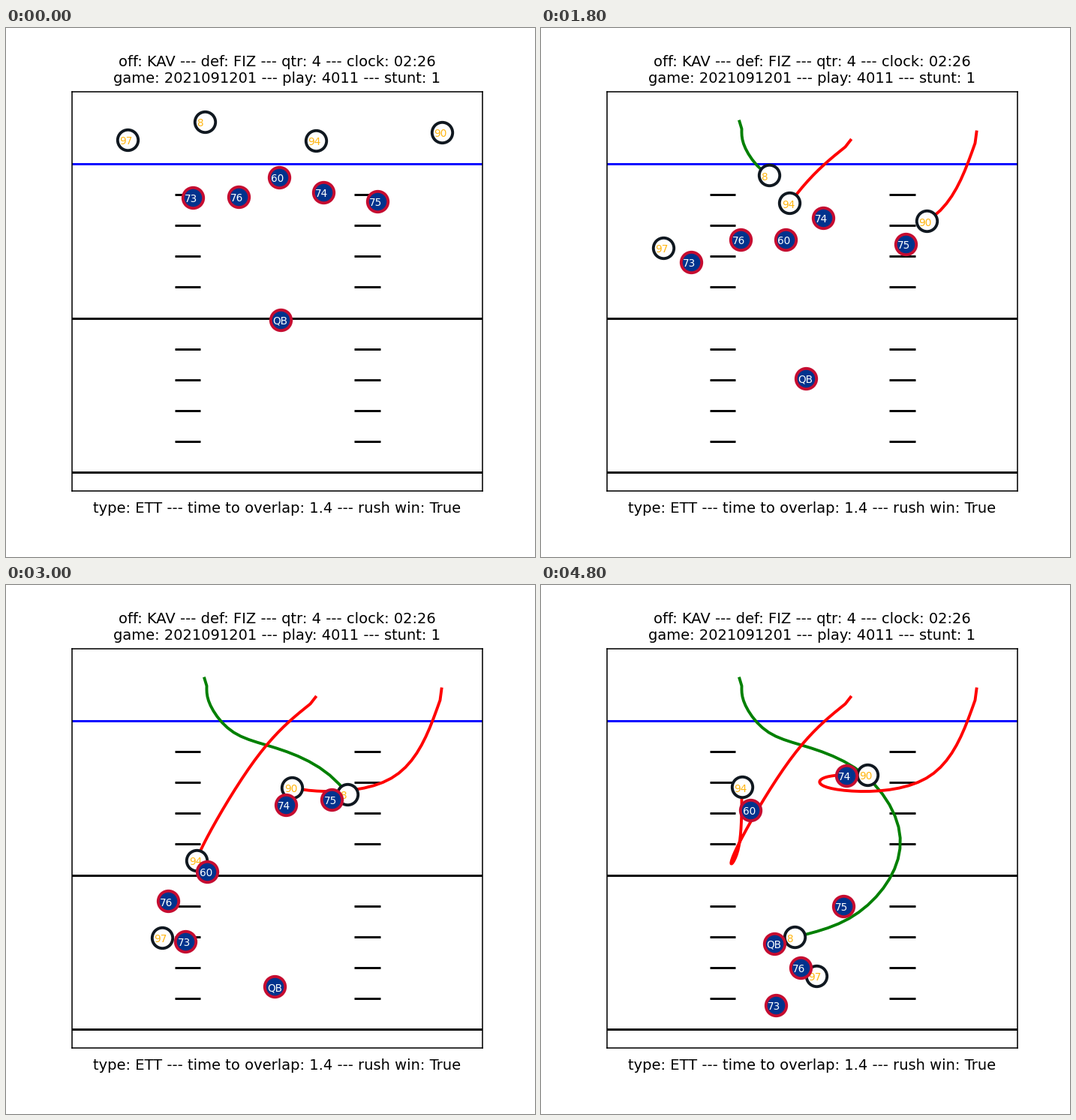
Write a matplotlib script that moves like this. It is 705 px wide and 705 px high and loops after 4.9 s.

```python
import numpy as np
import matplotlib.pyplot as plt
from matplotlib.animation import FuncAnimation

SIZE, DPI, FRAMES, INTERVAL = 705, 140, 49, 100
SNAP = 8                              # frame on which the play starts
SCRIMMAGE, YARD = 180.63, 41.08       # pixels

OFFENSE = dict(fill="#00338D", edge="#C60C30", ink="white", z=6)
DEFENSE = dict(fill="white", edge="#101820", ink="#FFB612", z=4)

plt.rcParams["font.family"] = "DejaVu Sans"
fig = plt.figure(figsize=(SIZE / DPI, SIZE / DPI), dpi=DPI, facecolor="white")
ax = fig.add_axes([0.125, 0.125, 0.775, 0.755])

# Data units are pixels of the whole stage, whole numbers at pixel centres.
ax.set_xlim(0.125 * SIZE - 0.5, 0.9 * SIZE - 0.5)
ax.set_ylim(0.875 * SIZE - 0.5, 0.12 * SIZE - 0.5)
ax.set(xticks=[], yticks=[])
ax.set_title("off: KAV --- def: FIZ --- qtr: 4 --- clock: 02:26\n"
             "game: 2021091201 --- play: 4011 --- stunt: 1", fontsize=10)
ax.set_xlabel("type: ETT --- time to overlap: 1.4 --- rush win: True",
              fontsize=10, labelpad=7.5)

for yard in range(11):
    y = SCRIMMAGE + yard * YARD
    if yard % 5 == 0:
        ax.axhline(y, color="black" if yard else "blue", lw=1.5, zorder=1)
    else:
        for x in (224.6, 463.8):
            ax.hlines(y, x, x + 34.2, color="black", lw=1.5, zorder=1)


def spline(points, t):
    """Natural cubic spline through evenly spaced points, for t in 0..1."""
    k = np.linspace(0, 1, len(points))
    line = np.vander(k, 2)
    system = np.block([[abs(k[:, None] - k) ** 3, line],
                       [line.T, np.zeros((2, 2))]])
    weights = np.linalg.solve(system, np.vstack([points, np.zeros((2, 2))]))
    return np.hstack([abs(t[:, None] - k) ** 3, np.vander(t, 2)]) @ weights


class Player:
    """Drifts from start to the first point, then runs through the rest."""

    def __init__(self, label, team, start, *points, trail=None):
        points = np.array(points, float)
        drift = np.linspace(start, points[0], SNAP, endpoint=False)
        run = spline(points, np.linspace(0, 1, FRAMES - SNAP))
        self.path = np.vstack([drift, run])
        self.disc, = ax.plot([], [], "o", ms=14.1, mew=2, mfc=team["fill"],
                             mec=team["edge"], zorder=team["z"])
        self.text = ax.text(0, 0, label, color=team["ink"], fontsize=7,
                            zorder=team["z"])
        self.trail, = ax.plot([], [], color=trail or "none", lw=2, zorder=3)

    def show(self, n):
        x, y = self.path[n]
        self.disc.set_data([x], [y])
        self.text.set_position((x - 0.25 * YARD, y + 0.15 * YARD))
        self.trail.set_data(*self.path[:n + 1].T)


players = [
    Player("97", DEFENSE, (161, 148),
           (169, 159), (162, 292), (194, 443), (275, 538), (366, 520)),
    Player("8", DEFENSE, (264, 124),
           (267, 134), (272, 160), (303, 196), (360, 217), (431, 253),
           (476, 322), (464, 391), (410, 444), (337, 469), trail="green"),
    Player("94", DEFENSE, (412, 149),
           (405, 158), (331, 233), (258, 355), (262, 353), (267, 269), trail="red"),
    Player("90", DEFENSE, (580, 138),
           (578, 153), (513, 257), (394, 272), (378, 256), (434, 252), trail="red"),
    Player("73", OFFENSE, (248, 225),
           (244, 230), (199, 311), (227, 446), (286, 560), (312, 559)),
    Player("76", OFFENSE, (309, 224),
           (300, 230), (265, 281), (218, 397), (241, 492), (345, 509)),
    Player("60", OFFENSE, (363, 198),
           (361, 207), (325, 281), (272, 371), (271, 379), (279, 299)),
    Player("74", OFFENSE, (422, 218),
           (419, 220), (375, 252), (371, 290), (380, 281), (406, 253)),
    Player("75", OFFENSE, (494, 230),
           (498, 244), (485, 287), (434, 284), (446, 321), (402, 427)),
    Player("QB", OFFENSE, (365, 388),
           (363, 391), (352, 466), (355, 535), (360, 501), (310, 477)),
]


def update(n):
    for player in players:
        player.show(n)
    return []


anim = FuncAnimation(fig, update, frames=FRAMES, interval=INTERVAL,
                     repeat=True, repeat_delay=0)
plt.show()
```
